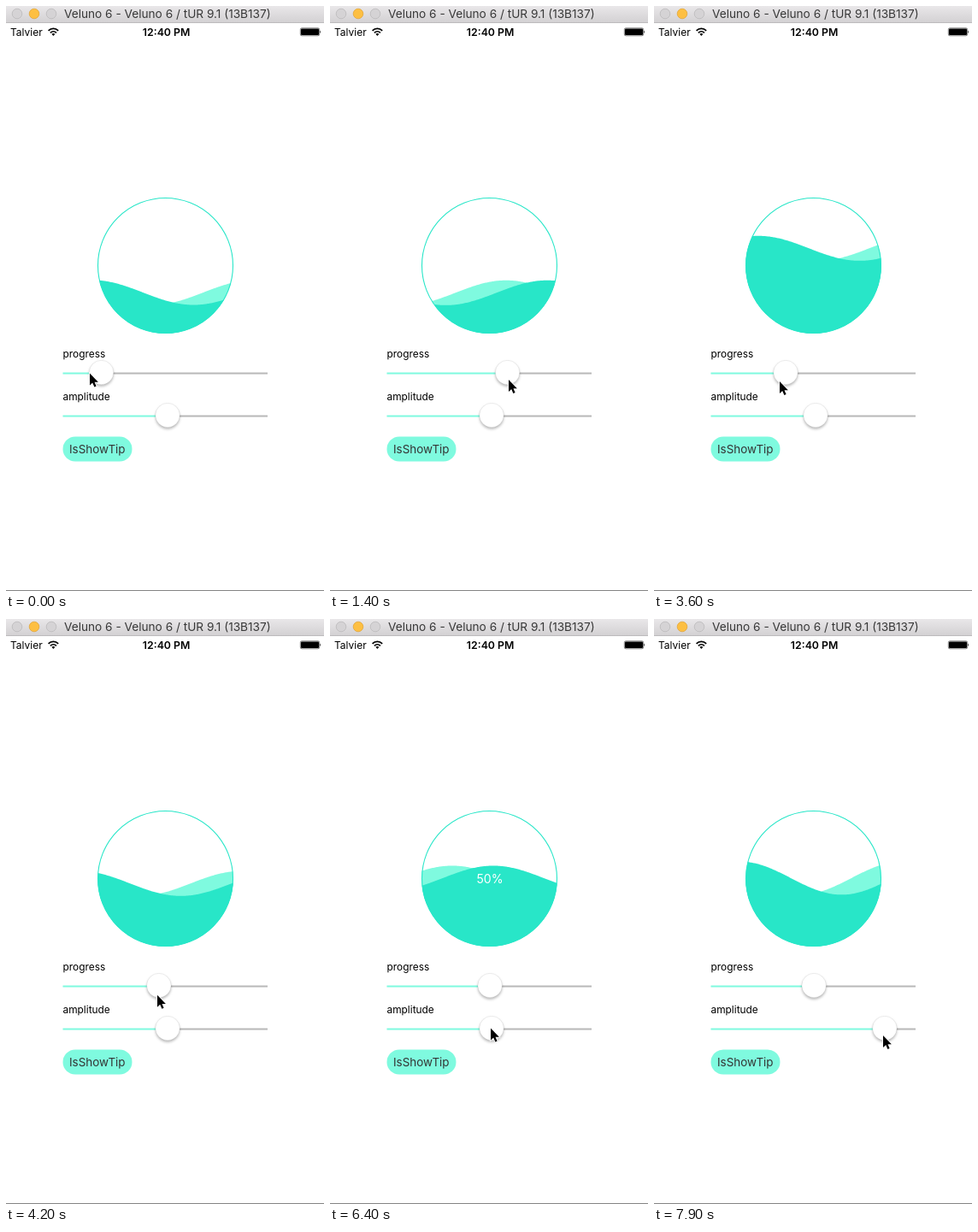
An HTML page that plays this animation: 372x684 px, repeating every 8 s.

```html
<!DOCTYPE html>
<html lang="en">
<head>
<meta charset="utf-8">
<title>Wave progress</title>
<style>
  html, body { margin: 0; width: 100%; height: 100%; overflow: hidden; background: #fff; }
  svg { display: block; width: 372px; height: 684px; font-family: Inter, Roboto, sans-serif; }
  .knob { fill: #fff; stroke: rgba(0, 0, 0, .13); stroke-width: .6; filter: drop-shadow(0 2.5px 1.8px rgba(0, 0, 0, .27)); }
  .label { font-size: 11.9px; fill: #000; }
</style>
</head>
<body>
<svg viewBox="0 0 372 684">
  <defs>
    <linearGradient id="bar" x2="0" y2="1">
      <stop stop-color="#e9e7e9"/>
      <stop offset="1" stop-color="#d2d0d2"/>
    </linearGradient>
    <clipPath id="disc"><circle cx="186.5" cy="303.5" r="79.3"/></clipPath>
  </defs>

  <!-- title bar -->
  <rect width="372" height="20" fill="url(#bar)"/>
  <rect y="19" width="372" height="1" fill="#bdbbbd"/>
  <g stroke-width=".8">
    <circle cx="13" cy="9" r="5.8" fill="#d5d3d5" stroke="#bcbabc"/>
    <circle cx="33" cy="9" r="5.8" fill="#fdbf42" stroke="#e3a63a"/>
    <circle cx="53" cy="9" r="5.8" fill="#d5d3d5" stroke="#bcbabc"/>
  </g>
  <text x="68" y="14" font-size="13.65" fill="#383838">Veluno 6 - Veluno 6 / tUR 9.1 (13B137)</text>

  <!-- status bar -->
  <text x="5" y="34.5" font-size="12">Talvier</text>
  <g fill="none" stroke="#000" stroke-width="1.7">
    <path d="M49.6 28.8 A8.2 8.2 0 0 1 61.2 28.8"/>
    <path d="M51.9 31.3 A5 5 0 0 1 58.9 31.3"/>
  </g>
  <path d="M53.4 32.8 A3 3 0 0 1 57.4 32.8 L55.4 35 Z"/>
  <text x="187.6" y="34.5" font-size="12.3" font-weight="600" text-anchor="middle">12:40 PM</text>
  <rect x="344.3" y="25.8" width="22.4" height="9" rx="1.8" fill="none" stroke="#000" stroke-width=".5"/>
  <rect x="345" y="26.6" width="21" height="7.5" rx="1"/>
  <path d="M367.4 28.6 Q369.2 30.3 367.4 32 Z"/>

  <!-- water -->
  <g clip-path="url(#disc)">
    <path id="back" fill="#7ffadf"/>
    <path id="front" fill="#28e6c8"/>
  </g>
  <circle cx="186.5" cy="303.5" r="79" fill="none" stroke="#28e6c8" stroke-width="1.1"/>
  <text id="tip" x="187" y="309" font-size="14.1" fill="#fff" text-anchor="middle">50%</text>

  <!-- controls -->
  <text class="label" x="66.5" y="410.5">progress</text>
  <text class="label" x="66.5" y="460.5">amplitude</text>
  <g id="progress" transform="translate(0 429)"></g>
  <g id="amplitude" transform="translate(0 479)"></g>
  <rect x="66.5" y="503.5" width="81" height="29" rx="14.5" fill="#7ffadf"/>
  <text x="74" y="523" font-size="13.45" fill="#333">IsShowTip</text>

  <rect y="683" width="372" height="1" fill="#858585"/>
  <path id="cursor" d="M0 0V14L3.2 11 5.4 16 7.6 15 5.5 10.2H9.9Z"
        stroke="#fff" stroke-width="1.6" paint-order="stroke"/>
</svg>

<script>
const LOOP = 8000, STEP = 100;
const WAVELENGTH = 237, SPEED = 0.06, LAG = 48, CREST = 101;
const LEFT = 106, RIGHT = 267, BOTTOM = 383, SIZE = 159;
const TRACK_START = 66.5, TRACK_END = 306, KNOB_MIN = 81, KNOB_TRAVEL = 211;
const TIP_ON = 5800;

// A move glides to its target between two times and then rests there.
const move = (start, end, ...to) => ({ start, end, to });

const progressMoves = [
  move(900, 1400, .6), move(1400, 2400, .72), move(3350, 3600, .346), move(3900, 4300, .503)
];
const amplitudeMoves = [move(6600, 7300, .895)];
const cursorMoves = [
  move(0, 900, 110, 436), move(900, 1400, 209, 437), move(1400, 2400, 245, 437),
  move(3350, 3600, 147, 439), move(3900, 4300, 187, 440), move(4300, 4900, 189, 475.5),
  move(5100, 5600, 105, 517), move(5900, 6400, 188, 478.5), move(6600, 7300, 268, 487)
];

const el = id => document.getElementById(id);
const clamp = (v, lo, hi) => Math.min(hi, Math.max(lo, v));

function pose(from, moves, t) {
  return moves.reduce((at, { start, end, to }) => {
    const k = clamp((t - start) / (end - start), 0, 1);
    return at.map((v, i) => v + (to[i] - v) * k);
  }, from);
}

const progressAt = t => pose([.145], progressMoves, t)[0];
const amplitudeAt = t => pose([.512], amplitudeMoves, t)[0];

// The water chases its slider by at most `rate` per step.
function chase(value, rate, target) {
  return Array.from({ length: LOOP / STEP }, (_, i) => {
    if (i) value += clamp(target(i * STEP) - value, -rate, rate);
    return value;
  });
}

const levels = chase(.302, .031, progressAt);
const heights = chase(14.5, .37, t => 28.4 * amplitudeAt(t));

function wave(crest, level, height) {
  let d = `M${LEFT} 390`;
  for (let x = LEFT; x <= RIGHT; x++) {
    const y = level - height * Math.cos((x - crest) / WAVELENGTH * 2 * Math.PI);
    d += `L${x} ${y.toFixed(2)}`;
  }
  return d + `L${RIGHT} 390Z`;
}

function makeSlider(id) {
  const group = el(id);
  group.innerHTML = `<rect class="rest" y="-.5" height="2" fill="#b8b8b8"/>
    <rect class="fill" x="${TRACK_START}" y="-.5" height="2" fill="#7ffadf"/>
    <circle class="knob" cy="-.5" r="14.2"/>`;
  const [rest, fill, knob] = group.children;
  return value => {
    const x = KNOB_MIN + KNOB_TRAVEL * value;
    fill.setAttribute('width', x - TRACK_START);
    rest.setAttribute('x', x);
    rest.setAttribute('width', TRACK_END - x);
    knob.setAttribute('cx', x);
  };
}

const setProgress = makeSlider('progress');
const setAmplitude = makeSlider('amplitude');

function draw(step) {
  const t = step * STEP;
  const level = BOTTOM - SIZE * levels[step];
  const crest = CREST - SPEED * t;
  el('front').setAttribute('d', wave(crest, level, heights[step]));
  el('back').setAttribute('d', wave(crest - LAG, level, heights[step]));
  el('tip').setAttribute('visibility', t >= TIP_ON ? 'visible' : 'hidden');
  setProgress(progressAt(t));
  setAmplitude(amplitudeAt(t));
  el('cursor').setAttribute('transform', `translate(${pose([98, 429.5], cursorMoves, t)})`);
}

const start = performance.now();
function tick() {
  draw(Math.floor((performance.now() - start) % LOOP / STEP));
  requestAnimationFrame(tick);
}
tick();
</script>
</body>
</html>
```
